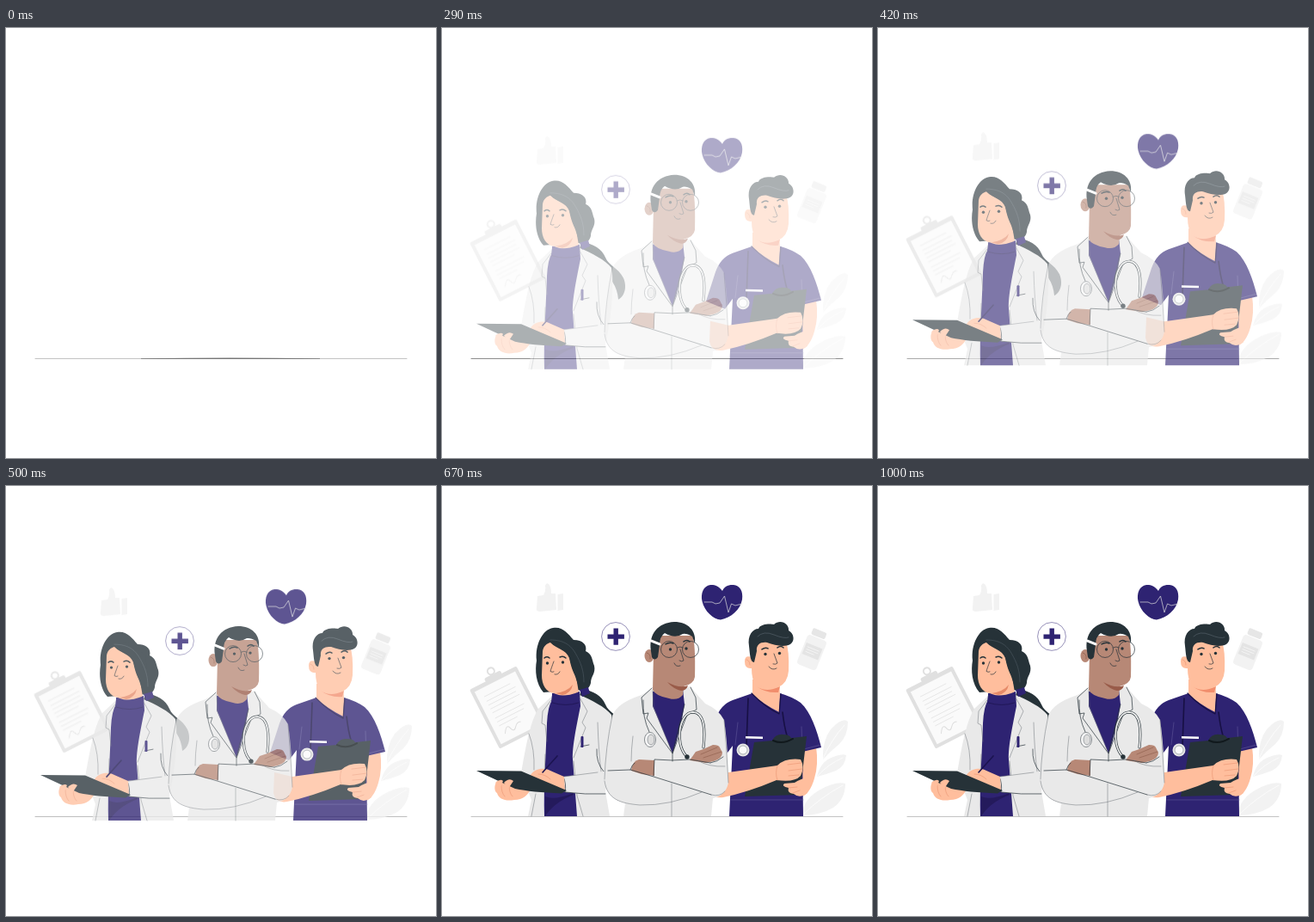
An HTML page that plays this animation: 500x500 px, repeating every 1040 ms.

```html
<!DOCTYPE html>
<html lang="en">
<head>
<meta charset="utf-8">
<title>Medical team</title>
<style>
html, body { margin: 0; width: 100%; height: 100%; overflow: hidden; background: #fff; }
svg { display: block; width: 100%; height: 100%; }
path, polyline { stroke-linecap: round; stroke-linejoin: round; }
.skin { fill: #ffbe9d; }
.tan { fill: #b78876; }
.dark { fill: #263238; }
.navy { fill: #2e2372; }
.coat { fill: #e9e9e9; }
.line { fill: none; stroke: #263238; stroke-width: .7; }
.bold { fill: none; stroke: #263238; stroke-width: 1.5; }
.soft { fill: none; stroke: #6b7177; stroke-width: .5; }
.crease { fill: none; stroke: #eb9a78; stroke-width: .7; }
.pale { fill: #f2f2f2; }
.vein { fill: none; stroke: #fff; stroke-width: .7; }
</style>
</head>
<body>
<svg viewBox="0 0 500 500">
  <path id="floor" d="M34 384.5H466" stroke-width="1"/>
  <path id="shade" d="M157 384.2Q260 382.8 365 384.2V385H157Z" fill="#777"/>

  <!-- floating objects -->
  <g class="cast">
    <g transform="translate(32 237) rotate(-27)">
      <rect width="61" height="77" rx="2" fill="#e0e0e0"/>
      <rect x="4" y="5" width="53" height="68" fill="#fafafa"/>
      <rect x="21" y="-4" width="21" height="7" rx="2" fill="#e0e0e0"/>
      <circle cx="32" cy="-8" r="4" fill="none" stroke="#e0e0e0" stroke-width="2"/>
      <path d="M12 15H45M12 21H49M12 26H47M12 31H49M12 36H40M12 43H49M12 48H46M12 53H35" stroke="#e4e4e4" stroke-width=".8"/>
      <path d="M14 64Q20 54 22 61T28 63T36 60" fill="none" stroke="#ddd" stroke-width="1"/>
    </g>
    <path class="pale" d="M111 128L118 127Q121 122 120 116Q121 112 124 114Q127 117 127 125L132 125L133 144L114 146Q109 146 110 142Z"/>
    <path class="pale" d="M134.500 126L141 125V144L134.500 145Z"/>
    <g transform="translate(430 191) rotate(22)">
      <rect class="pale" x="-11" y="-16" width="24" height="37" rx="4"/>
      <rect x="-8" y="-25" width="17" height="8" rx="2" fill="#e6e6e6"/>
      <rect x="-9" y="-6" width="20" height="14" fill="#e4e4e4"/>
      <path d="M-6-2H8M-6 1H8M-6 4H4" stroke="#f5f5f5" stroke-width=".8"/>
    </g>
    <path class="pale" d="M443 318Q442 296 452 283Q466 268 472 274Q472 290 462 300Q452 308 443 318Z"/>
    <path class="pale" d="M436 338Q440 320 455 315Q466 311 470 313Q469 326 458 331Q448 335 436 338Z"/>
    <path class="pale" d="M417 383Q422 362 440 353Q458 343 469 346Q469 364 455 374Q440 383 417 383Z"/>
    <path class="vein" d="M443 317Q452 296 468 278M437 337Q448 324 466 316M420 382Q440 362 466 348"/>
    <circle cx="202" cy="175" r="16.400" fill="#fff" stroke="#2e2372" stroke-width=".5"/>
    <path class="navy" d="M199.500 165.500h5.400v7h7v5.400h-7v7h-5.400v-7h-7v-5.400h7Z"/>
    <path class="navy" d="M326 122C322 116 316 114.500 312 115C304 116 300.500 125 302.500 134C305 146 316 155 324 155.600C336 153 347 144 349 132C350.500 122 346 115.500 339 115C333 114.500 328 117 326 122Z"/>
    <polyline points="305,135 314,135 318,137 323,136 328.500,128 333,147 336.500,137 341,139 349,137" fill="none" stroke="#ddd" stroke-width=".7"/>
  </g>

  <!-- woman with tablet -->
  <g class="cast">
    <path class="dark" d="M162 236C176 238 186 244 190 254C194 264 205 266 211 278C216 290 211 300 205 303C204 288 196 276 182 266C172 260 164 252 160 244Z"/>
    <path class="dark" d="M118 240C109 230 108 214 110 203C108 184 117 167 129 165C140 163 146 171 153 179C164 179 169 185 167 192C175 196 174 201 177 209C179 218 173 221 173 229C171 237 165 239 156 237Z"/>
    <path class="coat" d="M128 244L112 259C102 275 97 306 92 334L104 365L100 384H195L190 355C198 320 200 282 197 266C190 257 174 249 160 243Z"/>
    <path class="navy" d="M128 241L160 239L161 256C157 276 151 304 152 318L157 384H119C118 350 121 310 122 276Q123 256 128 249Z"/>
    <path class="skin" d="M117 192C118 186 122 183 126 182C134 190 144 190 148 200C150 210 152 216 156 222L159 240C152 245 139 245 130 241C121 240 116 231 116 220Z"/>
    <path d="M132 241Q146 239 152 231Q150 241 140 243Z" fill="#e58a68"/>
    <path class="navy" d="M128 243Q144 246 160 239V250Q144 256 127 251Z"/>
    <path class="dark" d="M125 180C134 191 144 188 148 199C151 212 155 220 159 234L166 225L162 192L143 176Z"/>
    <path d="M126 179C144 179 151 187 156 196S165 214 165 228" fill="none" stroke="#55616a" stroke-width=".5"/>
    <path class="navy" d="M160 237L170 234L172 241L163 245Z"/>
    <circle class="dark" cx="122.500" cy="206" r="1.700"/><circle class="dark" cx="140.500" cy="205" r="1.700"/>
    <path class="bold" d="M119 200Q122 197.500 125 200M137 199Q141 197 144 200"/>
    <path class="line" d="M130 204Q127 212 126 215.500Q128 217 130 216M131 219Q135 220 137 216"/>
    <path class="soft" d="M127 249L117 262L116 276L120 278L122 297M160 246L169 262L163 275L167 281L153 316M101 288Q108 306 107 330M181 275Q182 309 185 332M120 312L119 336M153 320L157 360L164 384M109 358L104 384"/>
    <path d="M128 252Q144 257 159 252" fill="none" stroke="#181046" stroke-width=".6"/>
    <path class="line" d="M161 303L171 301M180 306Q179 322 188 332"/>
    <rect class="navy" x="161.500" y="291" width="3" height="13" rx="1"/>
    <path class="skin" d="M64 343C60 348 61 356 64 357C66 364 74 367 84 365C94 365 101 359 104 350L83 342Z"/>
    <path class="crease" d="M69 348Q69 357 73 361M78 348Q78 357 82 361"/>
    <path class="coat" d="M141 338L190 332V358Q165 359 143 356Z"/>
    <path class="line" d="M141 338Q145 347 143 356Q166 359 190 358"/>
    <path class="soft" d="M142 338L181 333"/>
    <path class="skin" d="M103 336C108 328 119 327 126 331L142 338L143 355C137 358 129 354 120 349L101 340Z"/>
    <path class="dark" d="M40 331L92 331.500L145 354L139 357.500Q104 356 85 352Z"/>
    <path class="skin" d="M62 345Q68 340 71 343L68 350ZM72 345Q78 339 83 343L77 352Z"/>
    <path class="crease" d="M112 335Q120 335 126 341"/>
    <path d="M117 333L134 314" stroke="#1b1450" stroke-width="1.600"/>
    <path d="M120 361Q130 366 153 357V359Q130 368 120 384Z" fill="#241a5c"/>
  </g>

  <!-- man in scrubs -->
  <g class="cast">
    <path class="skin" d="M419 303L435 303Q438 324 433 340Q428 358 417 362L404 355L415 340Z"/>
    <path class="navy" d="M361 241L338 249Q324 254 318 271L307 305L329 314L338 302L334 384H420L419 309L441 304C436 284 429 263 417 252Q407 245 393 241Z"/>
    <path class="skin" d="M361 225L392 224L393 242L392 263Q374 254 361 242Z"/>
    <path d="M360 241Q374 256 392 265L394 242" fill="none" stroke="#181046" stroke-width="1.200"/>
    <path d="M366 233Q377 241 393 233L391 240Q376 241 366 233Z" fill="#f18d6c"/>
    <path class="skin" d="M361 180L400 181Q404 192 403 215Q402 229 391 234Q375 236 365 230Q360 226 360 212Q352 213 352 204Q352 196 360 199Z"/>
    <path class="dark" d="M363 205C358 205 358 194 357 186C355 174 361 166 368 166C370 160 382 160 386 161C394 154 404 161 403 168C409 171 411 180 405 184C397 188 387 185 378 182C371 181 365 184 366 192Z"/>
    <path d="M367 175Q374 168 386 173T403 176" fill="none" stroke="#64717a" stroke-width=".5"/>
    <circle class="dark" cx="376" cy="195.500" r="1.700"/><circle class="dark" cx="392.500" cy="194.500" r="1.700"/>
    <path class="bold" d="M372 190Q376 187 379 189M390 188Q394 185 397 188"/>
    <path class="line" d="M386 195L390 206Q388 208 385 207M380 210Q384 215 389 212"/>
    <path class="crease" d="M354 202Q358 203 358 208"/>
    <path d="M356 247L354 302M396 263Q398 280 401 290" fill="none" stroke="#171044" stroke-width="1.600"/>
    <path d="M419 309L418 280M341 301L344 275M336 365H420M421 306L440 301" fill="none" stroke="#6961a0" stroke-width=".5"/>
    <path d="M353 291L373 291.500V294L353 293.500Z" fill="#fff"/>
    <path class="dark" d="M363 298L384 296Q388 288 397 289Q404 289 406 293L424 291L416 359L352 361Z"/>
    <path d="M385 296Q396 301 408 294" fill="none" stroke="#11191d" stroke-width="2"/>
    <circle cx="350" cy="307" r="7.500" fill="#e5e5e5"/><circle cx="350" cy="307" r="5" fill="#fafafa" stroke="#8a9297" stroke-width=".7"/>
    <path class="skin" d="M312 328L333 333L390 325Q399 316 417 318Q422 327 417 337Q410 345 389 342Q356 356 327 362Q313 364 311 352Z"/>
    <path class="crease" d="M402 324L418 322M403 331L419 329M403 337L415 336M390 325Q387 334 390 342"/>
    <path class="skin" d="M427 338Q416 341 410 345L398 346Q394 349 403 351Q401 357 409 358Q416 364 425 357Z"/>
    <path class="crease" d="M403 351L413 350M408 357L416 354"/>
  </g>

  <!-- doctor with crossed arms -->
  <g class="cast">
    <path class="coat" d="M245 235L232 243Q204 252 198 267C193 286 190 316 189 338Q188 359 207 367L213 369L211 384H313L315 363Q330 360 333 345C333 320 331 292 328 272Q322 260 306 253L289 234Z"/>
    <path class="navy" d="M245 239L280 236L282 254Q277 286 268 311Q254 277 245 256Z"/>
    <path class="tan" d="M246 194L252 174L291 174Q295 182 294 222Q293 230 281 233L280 243Q274 250 264 247Q248 244 245 237Z"/>
    <ellipse class="tan" cx="241" cy="197.500" rx="5.500" ry="7.500"/>
    <path d="M262 228Q276 236 286 232Q284 238 278 238Q269 236 262 228Z" fill="#995b49"/>
    <path class="dark" d="M243 192C240 172 251 159 270 158C286 158 296 168 294 183L291 175Q284 171 280 172Q271 178 259 171Q253 175 253 185L251 199Q247 204 244 199Z"/>
    <path d="M243 180L253 184" stroke="#fff" stroke-width="3"/>
    <circle class="line" cx="264" cy="190" r="9.500"/><circle class="line" cx="289" cy="190" r="9.500"/>
    <path class="line" d="M273.500 188Q277 186 280 188"/>
    <circle class="dark" cx="265.500" cy="190" r="1.700"/><circle class="dark" cx="284" cy="189" r="1.700"/>
    <path class="bold" d="M260 184Q265 181 269 183M281 181Q285 178 288 181"/>
    <path class="line" d="M277 190L281 203Q279 205 276 203M270 206Q272 211 277 209"/>
    <path d="M238 194Q243 195 242 201" fill="none" stroke="#8b5b4a" stroke-width=".7"/>
    <path class="line" d="M244 235L232 246L234 265L240 264L238 270L268 311L282 254M289 234L295 246L296 260L285 266L268 311V320"/>
    <path class="soft" d="M245 238L246 257L268 311M267 346V384M222 291Q220 307 220 320M198 267Q190 305 189 341M328 272Q331 306 333 345"/>
    <path d="M284 314C270 299 276 263 292 263C306 264 306 286 304 304" fill="none" stroke="#263238" stroke-width="3"/>
    <path d="M284 314C270 299 276 263 292 263C306 264 306 286 304 304" fill="none" stroke="#eee" stroke-width="1.700"/>
    <circle class="dark" cx="285" cy="315" r="2.700"/>
    <path class="line" d="M234 249Q233 269 241 286"/>
    <ellipse cx="242" cy="295" rx="6.500" ry="8.500" fill="#f7f7f7" stroke="#6b7177" stroke-width=".8"/>
    <ellipse cx="243" cy="295" rx="4" ry="6" fill="#ddd" stroke="#6b7177" stroke-width=".6"/>
    <path class="tan" d="M220 331Q221 320 229 318L247 319V337L232 335Z"/>
    <path class="tan" d="M288 319L295 309Q305 306 315 301Q322 301 323 304L326 310Q326 317 316 320L307 322Z"/>
    <path d="M301 312L320 304M304 316L325 309" stroke="#8b5b4a" stroke-width=".6"/>
    <path class="line" d="M246 337L247 318Q268 320 288 318L312 322M193 331L219 330L246 338L313 359M219 330Q221 324 224 322M312 322Q320 321 327 315"/>
    <path class="soft" d="M189 343C192 365 208 369 230 371Q265 372 302 356M297 319Q310 327 329 326M313 359Q323 362 329 355"/>
  </g>
</svg>
<script>
const LOOP = 1040, START = 121, STEP = 1000 / 24, ENTER = 13, RISE = 20, BOB = 1.7;
const cast = document.querySelectorAll(".cast");
const floor = document.getElementById("floor");
const shade = document.getElementById("shade");

function lift(step) {
  if (step <= ENTER) return 0.5 + RISE * (1 - step / ENTER);
  return 0.5 - BOB * Math.sin(Math.PI * (step - ENTER) / 10);
}

function render(time) {
  const t = time % LOOP;
  const step = t < 130 ? 0 : Math.floor((t - START) / STEP) + 1;
  const shown = Math.min(step / ENTER, 1);
  for (const group of cast) {
    group.setAttribute("opacity", shown);
    group.setAttribute("transform", `translate(0 ${lift(step).toFixed(2)})`);
  }
  const gray = step ? Math.min(195, 90 + 10 * step) : 195;
  floor.setAttribute("stroke", `rgb(${gray},${gray},${gray})`);
  shade.setAttribute("visibility", step ? "hidden" : "visible");
}

const begin = performance.now();
function tick() {
  render(performance.now() - begin);
  requestAnimationFrame(tick);
}
tick();
</script>
</body>
</html>
```
